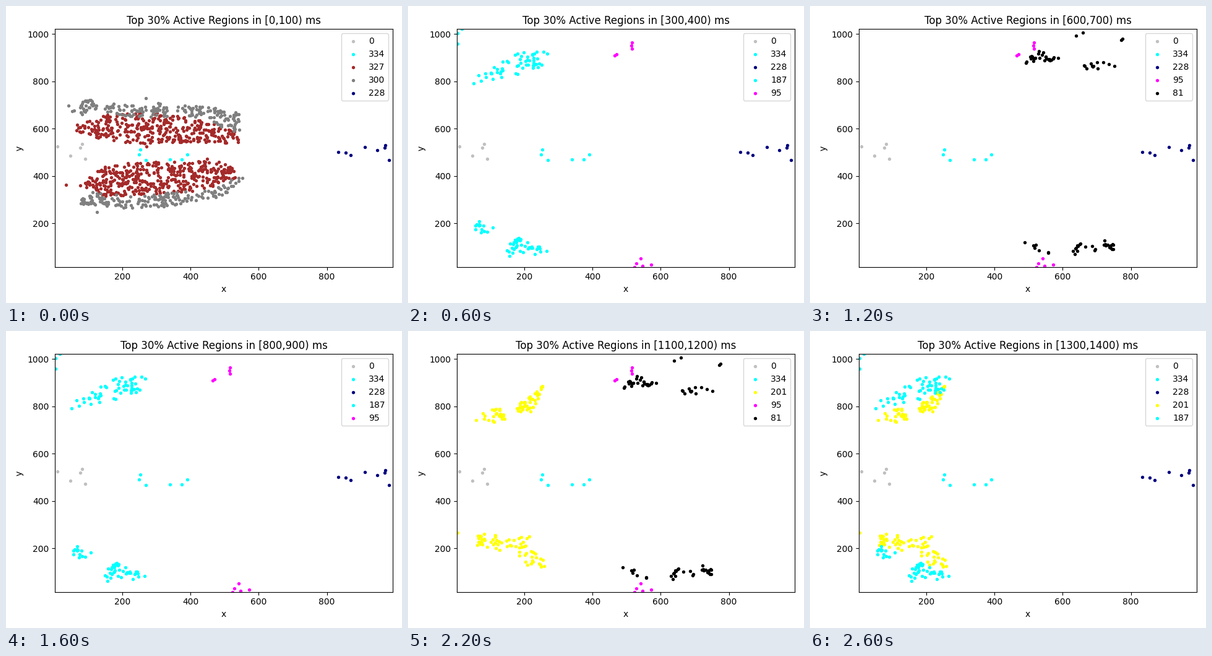
Animation of 640x480 px, one loop 2.8 s. Source, as a matplotlib script:

```python
import numpy as np
import matplotlib.pyplot as plt
from matplotlib.animation import FuncAnimation

W, H, DPI = 640, 480, 100
STEP = 200
XLIM, YLIM = (3, 993), (16, 1021)

rng = np.random.default_rng(7)


def band(xs, top, low, n):
    """n points spread evenly between two edges that bend at xs (stage pixels)."""
    size = 40 * n
    x = rng.uniform(xs[0], xs[-1], size)
    y = rng.uniform(min(top), max(low), size)
    inside = (y >= np.interp(x, xs, top)) & (y <= np.interp(x, xs, low))
    return np.column_stack([x, y])[inside][:n]


silver = [[(83, 228), (104, 242), (120, 230), (123, 224), (128, 248)]]
middle = [[(215, 240), (217, 233), (226, 250), (265, 249), (284, 249), (293, 240)]]
navy = [[(537, 236), (549, 237), (557, 241), (580, 229), (600, 234),
         (612, 230), (613, 226), (619, 250)]]
magenta = [[(334, 80), (337, 78), (361, 65), (362, 60), (362, 69),
            (366, 422), (369, 416), (376, 408), (379, 420), (393, 418)]]

brown = [
    band((114, 165, 230, 300, 377), (192, 176, 171, 180, 205),
         (204, 218, 223, 220, 222), 345),
    band((119, 158, 215, 300, 345, 383), (288, 259, 253, 250, 251, 270),
         (293, 308, 306, 300, 290, 273), 400),
    [(97, 289), (227, 228), (325, 248)],
]
gray = [
    band((120, 147), (152, 152), (177, 166), 28),
    band((160, 205, 262), (157, 159, 157), (172, 180, 180), 75),
    band((276, 320, 345, 378), (160, 162, 167, 170), (176, 181, 195, 208), 85),
    band((121, 200, 250, 350, 384), (299, 307, 304, 292, 268),
         (322, 327, 326, 308, 280), 175),
    [(101, 161), (107, 171), (110, 169), (226, 150), (147, 333)],
]
yellow = [
    band((108, 135, 163), (140, 126, 122), (148, 151, 142), 26),
    band((174, 198, 218), (120, 106, 89), (130, 131, 102), 46),
    band((112, 152), (324, 328), (346, 356), 28),
    band((158, 198), (332, 332), (354, 350), 17),
    band((174, 205, 223), (358, 356, 374), (372, 383, 380), 22),
    [(80, 326)],
]
cyan = [
    band((102, 140, 166), (118, 94, 80), (134, 124, 110), 20),
    band((172, 190, 227), (75, 75, 71), (112, 110, 92), 34),
    band((107, 125, 143), (345, 348, 360), (360, 373, 368), 13),
    band((157, 176, 192, 227), (388, 373, 379, 398), (408, 399, 401, 406), 37),
    [(80, 44), (87, 37), (80, 62)],
]
black = [
    band((345, 366, 403), (92, 72, 82), (98, 93, 86), 28),
    band((441, 475, 493), (93, 91, 95), (102, 102, 98), 12),
    band((347, 396), (378, 398), (388, 404), 7),
    band((420, 442, 462), (390, 377, 390), (408, 390, 397), 13),
    band((475, 497), (377, 386), (390, 396), 14),
    [(430, 48), (441, 43), (503, 56), (505, 54)],
]

REGIONS = {
    0: ("silver", silver),
    334: ("cyan", middle),
    327: ("brown", brown),
    300: ("gray", gray),
    228: ("navy", navy),
    201: ("yellow", yellow),
    187: ("cyan", cyan),
    95: ("magenta", magenta),
    81: ("black", black),
}

# Active regions for each time window
START = (0, 334, 327, 300, 228)
LEFT = (0, 334, 228, 201, 187)
OUTER = (0, 334, 228, 187, 95)
RIGHT = (0, 334, 228, 95, 81)
MIXED = (0, 334, 201, 95, 81)
WINDOWS = ([START] + [LEFT] * 2 + [OUTER] * 3 + [RIGHT] * 2
           + [OUTER] * 2 + [LEFT, MIXED, OUTER, LEFT])

fig, ax = plt.subplots(figsize=(W / DPI, H / DPI), dpi=DPI)


def dress(i):
    ax.set(xlim=XLIM, ylim=YLIM, xlabel="x", ylabel="y",
           title=f"Top 30% Active Regions in [{100 * i},{100 * (i + 1)}) ms")


dress(0)
fig.tight_layout()
to_data = ax.transData.inverted()


def locate(parts):
    """Turn stage pixels into data coordinates."""
    x, y = np.vstack(parts).T
    return to_data.transform(np.column_stack([x - 0.5, H - y + 0.5]))


PLACES = {key: locate(parts) for key, (_, parts) in REGIONS.items()}


def draw(i):
    ax.clear()
    for key in WINDOWS[i]:
        x, y = PLACES[key].T
        ax.scatter(x, y, s=8, color=REGIONS[key][0], label=str(key))
    dress(i)
    ax.legend(loc="upper right")
    return ax.get_children()


anim = FuncAnimation(fig, draw, frames=len(WINDOWS), init_func=lambda: draw(0),
                     interval=STEP, repeat=True, blit=False)
plt.show()
```
